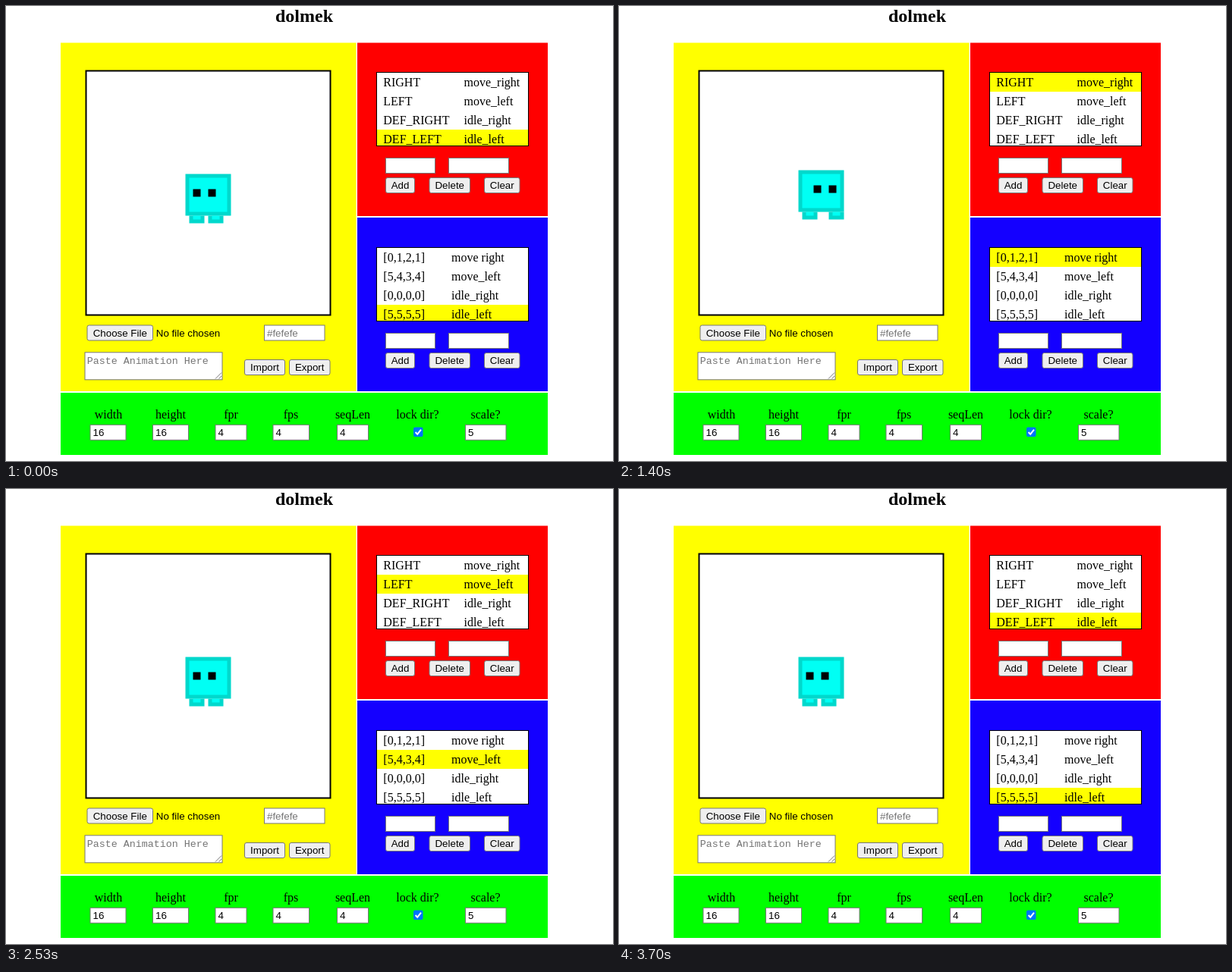
Animation, 800 px wide and 600 px high, one loop 4170 ms. Source, as an HTML page:

```html
<!DOCTYPE html>
<html lang="en">
<head>
<meta charset="utf-8">
<title>Sprite editor</title>
<style>
  html, body { margin: 0; width: 100%; height: 100%; overflow: hidden; background: #fff; }
  svg { display: block; width: 800px; height: 600px; }
  text { font: 16px "Liberation Serif", serif; white-space: pre; }
  .ui { font: 13.333px "Liberation Sans", sans-serif; }
  .mono { font: 13.333px "Liberation Mono", monospace; }
  .title { font-size: 24px; font-weight: bold; }
  .mid { text-anchor: middle; }
  .hint { fill: #757575; }
</style>
</head>
<body>
<svg id="stage" viewBox="0 0 800 600" xmlns="http://www.w3.org/2000/svg"></svg>
<script>
const NS = "http://www.w3.org/2000/svg";
const stage = document.getElementById("stage");

function add(tag, attrs, parent = stage) {
  const el = document.createElementNS(NS, tag);
  for (const key in attrs) el.setAttribute(key, attrs[key]);
  parent.appendChild(el);
  return el;
}
const rect = (x, y, width, height, fill, more = {}, parent) =>
  add("rect", { x, y, width, height, fill, ...more }, parent);
function label(str, x, y, cls = "") {
  add("text", { x, y, class: cls }).textContent = str;
}
const edge = { stroke: "#767676", "stroke-width": 1 };

function field(x, y, w, h = 20, value = "", cls = "ui") {
  rect(x, y, w, h, "#fff", edge);
  if (value) label(value, x + 3.5, y + 15, cls);
}
function button(str, x, y, w) {
  rect(x, y, w, 20, "#efefef", { ...edge, rx: 2.5 });
  label(str, x + w / 2, y + 14.5, "ui mid");
}

// List box with a movable highlight, plus its fields and buttons
function list(top, col, rows) {
  rect(488, top - 1, 201, 98, "#000");
  rect(489, top, 199, 96, "#fff");
  const mark = rect(489, top, 199, 25, "#ff0");
  rows.forEach(([a, b], i) => {
    const y = top + 18 + i * 24.9;
    label(a, 497.3, y);
    label(b, col, y);
  });
  field(500.5, top + 112.5, 65);
  field(583.5, top + 112.5, 79);
  button("Add", 500.5, top + 138.5, 38);
  button("Delete", 558, top + 138.5, 53.5);
  button("Clear", 630.5, top + 138.5, 46.5);
  return row => {
    mark.setAttribute("y", top + 25 * row);
    mark.setAttribute("height", row === 3 ? 21 : 25);
  };
}

label("dolmek", 393, 20.5, "title mid");
rect(72, 48.5, 389.5, 459.5, "#ff0");
rect(463, 48.5, 251, 228.5, "#f00");
rect(463, 279, 251, 229, "#1400ff");
rect(72, 510, 642, 82, "#0f0");

rect(105.5, 85.5, 322, 322, "#fff", { stroke: "#000", "stroke-width": 2 });
button("Choose File", 107, 421, 86.5);
label("No file chosen", 197.8, 435.8, "ui");
field(340.5, 421, 79.5, 20, "#fefefe", "ui hint");
rect(104, 456.8, 181, 36, "#fff", edge);
label("Paste Animation Here", 106.8, 471.5, "mono hint");
add("path", { d: "M276 491.5L284 483.5M280.5 491.5L284 488", stroke: "#777", fill: "none" });
button("Import", 314.5, 466.5, 53);
button("Export", 373.5, 466.5, 53.5);

const markKey = list(88, 603.5, [
  ["RIGHT", "move_right"], ["LEFT", "move_left"],
  ["DEF_RIGHT", "idle_right"], ["DEF_LEFT", "idle_left"]]);
const markSeq = list(319, 587, [
  ["[0,1,2,1]", "move right"], ["[5,4,3,4]", "move_left"],
  ["[0,0,0,0]", "idle_right"], ["[5,5,5,5]", "idle_left"]]);

[["width", 135, 111, 47, "16"], ["height", 217, 193.5, 47, "16"],
 ["fpr", 296.5, 276, 41, "4"], ["fps", 375.5, 352, 47.5, "4"],
 ["seqLen", 457, 436.5, 41, "4"], ["scale?", 632, 605.5, 53.5, "5"]
].forEach(([name, mid, x, w, value]) => {
  label(name, mid, 543.5, "mid");
  field(x, 552.3, w, 20, value);
});
label("lock dir?", 542.5, 543.5, "mid");
rect(537, 555.5, 12.5, 12.5, "#0075ff", { rx: 2 });
add("path", { d: "M539.6 562L542.2 564.7L547 558.6", stroke: "#fff", "stroke-width": 2, fill: "none" });

// Three strides on a 16-cell grid: lift, left foot column, right foot column
const strides = [[0, 4, 9], [1, 3, 10], [2, 0, 12]];
const DARK = "#00d8cc", LIGHT = "#00fff4";

function makePose([lift, footA, footB], left) {
  const g = add("g", { transform: "translate(226.5 206.5) scale(5)" });
  const cell = (x, y, w, h, fill) =>
    rect(left ? 16 - x - w : x, y - lift, w, h, fill, {}, g);
  cell(2, 3, 12, 11, DARK);
  cell(3, 4, 10, 9, LIGHT);
  cell(6, 7, 2, 2, "#000");
  cell(10, 7, 2, 2, "#000");
  for (const x of [footA, footB]) {
    cell(x, 14, 4, 2, DARK);
    cell(x + 1, 14, 2, 1, LIGHT);
  }
  return g;
}
const poses = [false, true].map(left => strides.map(s => makePose(s, left)));

const cursor = add("path", {
  d: "M773.5 593.5V606L776.5 603L779 600Z", fill: "#000", stroke: "#fff", "stroke-width": .5
});

// Walk clocks: [time, step count] knots, linear in between
const walkRight = [[660, 0], [1100, 7], [1220, 9], [1640, 15], [1820, 18], [1930, 18.9]];
const walkLeft = [[2530, 0], [2830, 5], [2940, 7], [3060, 8], [3340, 13], [3580, 17], [3700, 17.9]];
const cycle = [0, 1, 2, 1];

function stride(t, knots) {
  let i = 1;
  while (i < knots.length - 1 && t >= knots[i][0]) i++;
  const [t0, n0] = knots[i - 1], [t1, n1] = knots[i];
  const step = Math.floor(n0 + (n1 - n0) * (t - t0) / (t1 - t0) + 1e-6);
  return cycle[step % 4];
}

function draw(t) {
  let row = 3, left = true, pose = 0;
  if (t >= 660 && t < 1930) {
    row = 0; left = false; pose = stride(t, walkRight);
  } else if (t >= 1930 && t < 2530) {
    row = 2; left = false;
  } else if (t >= 2530 && t < 3700) {
    row = t < 3640 ? 1 : 3;
    pose = stride(t, walkLeft);
  }
  markKey(row);
  markSeq(row);
  poses.forEach((set, side) => set.forEach((g, i) =>
    g.setAttribute("display", side === +left && i === pose ? "inline" : "none")));
  cursor.setAttribute("display", t >= 3340 && t < 3400 ? "inline" : "none");
}

const start = performance.now();
function tick() {
  draw((performance.now() - start) % 4170);
  requestAnimationFrame(tick);
}
tick();
</script>
</body>
</html>
```
